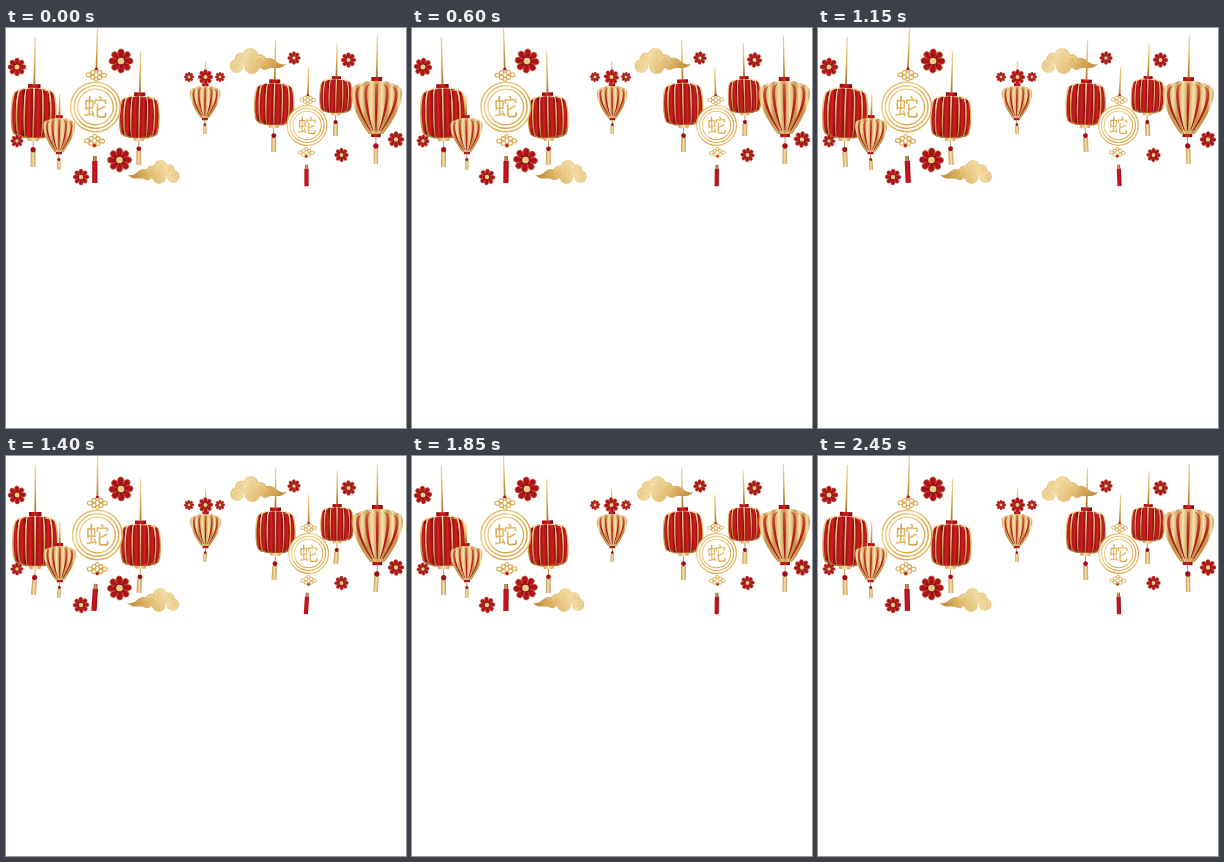
Write an HTML page with a canvas that moves like this. It is 400 px wide and 400 px high and loops after 2500 ms.

```html
<!DOCTYPE html>
<html lang="en">
<head>
<meta charset="utf-8">
<title>Swinging lanterns</title>
<style>
  html, body { margin: 0; width: 100%; height: 100%; overflow: hidden; background: #fff; }
  canvas { display: block; width: 400px; height: 400px; }
</style>
</head>
<body>
<canvas id="stage" width="400" height="400"></canvas>
<script>
const ctx = document.getElementById('stage').getContext('2d');
const LOOP = 2500, STEP = 50, SWING = 1250, TAU = Math.PI * 2, DEG = Math.PI / 180;
const GOLD = ['#c8964b', '#f7e1ae', '#c9974c'];
const RED = ['#8f0b12', '#d3201f', '#74070f'];
const RIB = ['#f6e0ac', '#dcab5c', '#b07a35'];

// x, pivot y, body top, half width, body height, tassel end, swing in degrees, golden
const lanterns = {
  redLeft: [29.3, 9, 60, 22.2, 50, 139, 1.7, false],
  goldLeft: [53.8, 66, 90, 16, 34, 142, 1.3, true],
  redMid: [134.6, 23, 68, 19.8, 42, 137, 1.6, false],
  goldMid: [199.6, 33, 58, 15.2, 32, 106, 1, true],
  redRight: [269.6, 12, 55, 19.5, 42, 124, 1.7, false],
  redFar: [331.2, 15, 51, 16.2, 34, 108, 1.8, false],
  goldFar: [371.4, 8, 53, 25.5, 53, 136, 1.2, true],
};

const flowers = [
  [11, 39, 9], [115, 33, 12], [11, 113, 6.3], [113.5, 132, 12], [75, 149, 8],
  [183, 49, 5], [199.5, 49, 7.5], [214, 49, 5],
  [288, 30, 6.5], [342.5, 32, 7.5], [390, 111.5, 8], [335.5, 127, 7],
];

function gradient(x0, y0, x1, y1, colors) {
  const g = ctx.createLinearGradient(x0, y0, x1, y1);
  colors.forEach((c, i) => g.addColorStop(i / (colors.length - 1), c));
  return g;
}

function box(x, y, w, h, fill) {
  ctx.fillStyle = fill;
  ctx.fillRect(x, y, w, h);
}

function disc(x, y, r, fill) {
  ctx.beginPath();
  ctx.arc(x, y, r, 0, TAU);
  ctx.fillStyle = fill;
  ctx.fill();
}

function ring(x, y, rx, ry, width, color) {
  ctx.beginPath();
  ctx.ellipse(x, y, rx, ry, 0, 0, TAU);
  ctx.lineWidth = width;
  ctx.strokeStyle = color;
  ctx.stroke();
}

function at(x, y, angle, draw) {
  ctx.save();
  ctx.translate(x, y);
  ctx.rotate(angle);
  draw();
  ctx.restore();
}

// The body leads; its tassel trails behind at its own tilt.
const bodyAngle = (t, degrees) => degrees * DEG * Math.cos(TAU * (t + 155) / SWING);
const tasselAngle = t => 5.5 * DEG * Math.sin(TAU * t / SWING);

function string(length, width) {
  ctx.fillStyle = gradient(0, 0, 0, length, ['#f0d79a', '#dfb35a', '#a87327']);
  ctx.beginPath();
  ctx.moveTo(-width * .4, 0);
  ctx.lineTo(width * .4, 0);
  ctx.lineTo(width * .6, length);
  ctx.lineTo(-width * .6, length);
  ctx.fill();
}

// Lobe of the lantern body between two ribs, each given as a share of the half width.
function lobe(left, right, top, w, h, golden) {
  const [a, b, c, d, v1, v2] = golden ? [.72, 1.25, 1, .28, 0, .55] : [.8, 1.07, 1.07, .8, 0, 1];
  const sag = .07 * h, bulge = .06 * w, l = left * w, r = right * w, mid = (l + r) / 2;
  const topL = top + sag * left ** 2, topR = top + sag * right ** 2;
  const low = golden ? 0 : sag, bottom = top + h;
  const endL = bottom - low * left ** 2, endR = bottom - low * right ** 2;
  ctx.beginPath();
  ctx.moveTo(l * a, topL);
  ctx.bezierCurveTo(l * b, topL + h * v1, l * c, top + (endL - top) * v2, l * d, endL);
  ctx.quadraticCurveTo(mid * d, (endL + endR) / 2 + (golden ? 0 : bulge), r * d, endR);
  ctx.bezierCurveTo(r * c, top + (endR - top) * v2, r * b, topR + h * v1, r * a, topR);
  ctx.quadraticCurveTo(mid * a, (topL + topR) / 2 - bulge, l * a, topL);
  ctx.closePath();
}

function lantern(t, [x, pivot, bodyTop, w, h, end, degrees, golden]) {
  const angle = bodyAngle(t, degrees), top = bodyTop - pivot, bottom = top + h;
  const size = w / 20, cap = (golden ? 4.2 : 5.6) * size, capH = 3.6 * Math.min(size, 1.1);
  const rib = k => Math.sin(k * .4) / Math.sin(1.2);
  at(x, pivot, angle, () => {
    string(top - capH, 1.5);
    for (let k = -3; k < 3; k++) {
      const l = rib(k), r = rib(k + 1);
      lobe(l, r, top, w, h, golden);
      ctx.fillStyle = gradient(l * w, 0, r * w, 0, golden ? GOLD : RED);
      ctx.fill();
      if (!golden) {
        ctx.lineWidth = 1.3 * size;
        ctx.strokeStyle = gradient(0, top, 0, bottom, RIB);
        ctx.stroke();
      }
    }
    // Red slits between the golden lobes.
    for (let k = -2; golden && k < 3; k++) {
      lobe(rib(k) - .055, rib(k) + .055, top + h * .06, w, h * .88, true);
      ctx.fillStyle = gradient(0, top, 0, bottom, ['#c8653a', '#bb1c1d', '#8f0c13']);
      ctx.fill();
    }
    box(-cap, top - capH, cap * 2, capH, gradient(-cap, 0, cap, 0, RED));
    const lower = golden ? RED : GOLD;
    box(-cap * .9, bottom, cap * 1.8, capH * .8, gradient(-cap, 0, cap, 0, lower));

    const joint = bottom + capH * .8, length = end - pivot - joint;
    at(0, joint, tasselAngle(t) - angle, () => {
      const tw = golden ? 1 + size * .95 : 2.4;
      box(-.4, 0, .8, length * .4, '#b58138');
      box(-tw, length * .42, tw * 2, length * .58, gradient(-tw, 0, tw, 0, GOLD));
      disc(0, length * .33, length * .1, '#a50d18');
    });
  });
}

function knot(y) {
  at(0, y, 0, () => {
    const color = '#d9a850';
    for (const side of [-1, 1]) {
      ring(side * 7.6, 0, 2.4, 2, 1.1, color);
      ring(side * 3.4, -2.4, 2.2, 2, 1.1, color);
      ring(side * 3.4, 2.4, 2.2, 2, 1.1, color);
    }
    ring(0, -4.6, 1.9, 1.9, 1.1, color);
    ring(0, 4.3, 1.9, 1.9, 1.1, color);
    disc(0, y < 0 ? -6 : 4.6, 1.5, '#b5141c');
  });
}

function medallion(t, x, pivot, center, scale, degrees) {
  const angle = bodyAngle(t, degrees);
  at(x, pivot, angle, () => {
    string(center - pivot - 37 * scale, 1.5);
    ctx.translate(0, center - pivot);
    ctx.scale(scale, scale);
    const gold = gradient(-25, -25, 25, 25, ['#dba94d', '#f0d08a', '#d9a447', '#ecc979']);
    disc(0, 0, 25, '#fff');
    ring(0, 0, 24.8, 24.8, 1.5, gold);
    ring(0, 0, 21.3, 21.3, 1.5, gold);
    ring(0, 0, 17.8, 17.8, 1.3, gold);
    ctx.font = '24px "Noto Sans CJK SC", "Noto Sans CJK", sans-serif';
    ctx.textAlign = 'center';
    ctx.textBaseline = 'alphabetic';
    ctx.fillStyle = gradient(-12, -12, 12, 12, ['#cc9538', '#e6bf6c', '#cc9538']);
    ctx.fillText('蛇', 0, 9);
    knot(-32);
    knot(34);
    at(0, 24, tasselAngle(t) - angle, () => {
      box(-1.8, 25, 3.6, 5, gradient(-2, 0, 2, 0, ['#77502a', '#d1a35c', '#704018']));
      box(-2.6, 30, 5.2, 22, gradient(-3, 0, 3, 0, ['#9c0d15', '#d5161f', '#8c0910']));
    });
  });
}

function flower(t, [x, y, r]) {
  at(x, y, 5 * DEG * Math.sin(TAU * t / LOOP), () => {
    for (let i = 0; i < 8; i++) {
      ctx.rotate(TAU / 8);
      ctx.beginPath();
      ctx.ellipse(0, -r * .65, r * .27, r * .35, 0, 0, TAU);
      ctx.fillStyle = gradient(0, -r, 0, -r * .2, ['#a50d18', '#b8111c', '#76080f']);
      ctx.fill();
      ctx.lineWidth = r * .06;
      ctx.strokeStyle = '#c0713f';
      ctx.stroke();
    }
    disc(0, 0, r * .38, '#8a0c13');
    disc(0, 0, r * .28, '#efcb85');
  });
}

function cloud(x, y, sx, sy) {
  at(x, y, 0, () => {
    ctx.scale(sx, sy);
    ctx.beginPath();
    const puffs = [[7.5, 18, 7], [12, 11, 6.5], [21.5, 8, 8], [31, 13, 7], [23, 18, 8], [36, 17, 5]];
    for (const [px, py, r] of puffs) {
      ctx.moveTo(px + r, py);
      ctx.arc(px, py, r, 0, TAU);
    }
    ctx.moveTo(35, 11);
    ctx.bezierCurveTo(47, 6, 47, 19, 58, 16);
    ctx.bezierCurveTo(50, 24, 45, 17, 37, 22);
    ctx.fillStyle = gradient(0, 0, 50, 24, ['#e0b669', '#f1d9a0', '#e2bb70', '#c48e42']);
    ctx.fill();
    ctx.lineWidth = .6;
    ctx.strokeStyle = '#f8e8c0';
    for (const [px, py, r] of puffs.slice(0, 4)) {
      ctx.beginPath();
      ctx.arc(px, py, r * .65, 3, 6.4);
      ctx.stroke();
    }
  });
}

function draw(now) {
  const t = Math.floor(now % LOOP / STEP) * STEP;
  const drift = 1.2 * Math.sin(TAU * t / LOOP);
  ctx.clearRect(0, 0, 400, 400);
  cloud(174 + drift, 132, -.9, .92);
  cloud(223.3 - drift, 20, .98, 1);
  lantern(t, lanterns.redLeft);
  lantern(t, lanterns.goldLeft);
  lantern(t, lanterns.redMid);
  medallion(t, 91.5, 0, 79, 1, 2.1);
  lantern(t, lanterns.goldMid);
  lantern(t, lanterns.redRight);
  medallion(t, 302.7, 39, 97.5, .8, 2.3);
  lantern(t, lanterns.redFar);
  lantern(t, lanterns.goldFar);
  flowers.forEach(f => flower(t, f));
  requestAnimationFrame(frame);
}

const start = performance.now();
const frame = () => draw(performance.now() - start);
frame();
</script>
</body>
</html>
```
